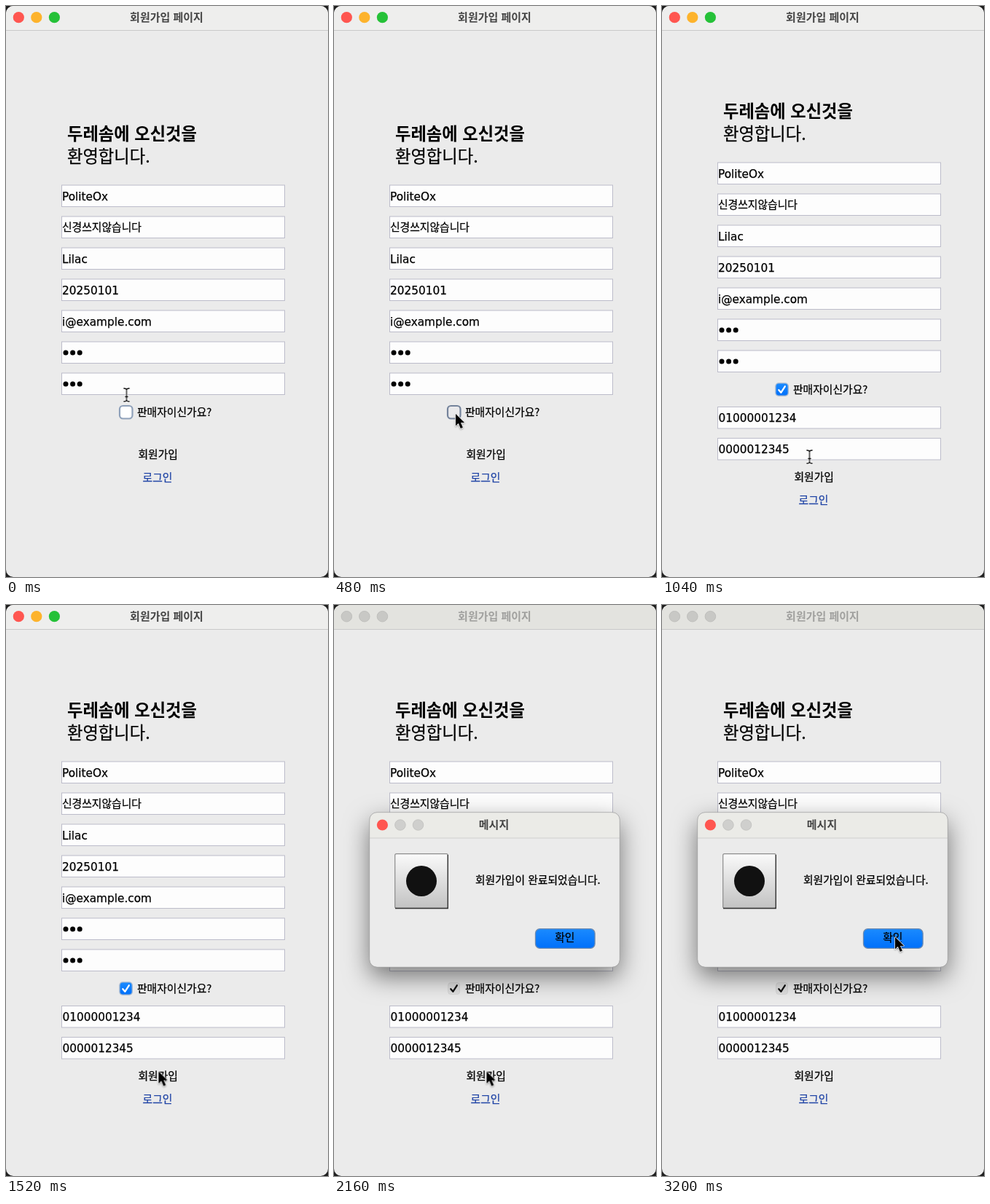
An HTML page for the animation above (3360 ms loop, 442 by 784 pixels).

```html
<!DOCTYPE html>
<html lang="ko">
<head>
<meta charset="utf-8">
<title>회원가입 페이지</title>
<style>
html, body { margin: 0; width: 100%; height: 100%; overflow: hidden; background: #1e1e1e; }
svg { display: block; width: 442px; height: 784px; }
text { font: 14.8px "Noto Sans CJK KR", "Noto Sans CJK", sans-serif; stroke: #000; stroke-width: .25px; }
.latin { font: 15.3px "DejaVu Sans", sans-serif; }
.big { font-size: 23.3px; }
.bold { font-weight: 700; stroke: none; }
.mid { text-anchor: middle; }
.link { fill: #2246a6; stroke: #2246a6; }

/* One loop is 42 slots of 80 ms; keyframe percentages are slot / 42. */
.open, .press, .leave, .done, .move, .beam, .arrow, .hold { animation: 3360ms step-end infinite; }
.open { animation-name: open; }
.leave { animation-name: leave; }
.done { animation-name: done; }
.hold { animation-name: hold; }
.move { animation-name: move; }
.beam { animation-name: beam; }
.arrow { animation-name: arrow; }
.shift { animation: shift 3360ms step-end infinite; }
.off { --a: 1; --b: 0; }

@keyframes open { 0% { opacity: var(--a, 0) } 16.66%, to { opacity: var(--b, 1) } }
@keyframes leave { 0% { opacity: var(--a, 0) } 59.52%, to { opacity: var(--b, 1) } }
@keyframes done { 0% { opacity: var(--a, 0) } 64.28%, to { opacity: var(--b, 1) } }
@keyframes shift { 0% { transform: none } 16.66%, to { transform: translateY(var(--dy)) } }
@keyframes hold { 0% { fill: #fff; stroke: #8fa1ba } 11.9%, to { fill: #e9e9eb; stroke: #74839b } }
@keyframes beam {
  0% { opacity: 1 } 2.38% { opacity: 0 } 16.66% { opacity: 1 }
  23.8% { opacity: 0 } 26.18% { opacity: 1 } 33.33%, to { opacity: 0 }
}
@keyframes arrow {
  0% { opacity: 0 } 2.38% { opacity: 1 } 16.66% { opacity: 0 }
  23.8% { opacity: 1 } 26.18% { opacity: 0 } 33.33%, to { opacity: 1 }
}
@keyframes move {
  0% { transform: translate(165.5px, 534px); animation-timing-function: steps(5) }
  11.9% { transform: translate(167px, 560px) }
  16.66% { transform: translate(166.5px, 560px); animation-timing-function: steps(6) }
  30.95% { transform: translate(202.5px, 619px); animation-timing-function: steps(4) }
  40.47% { transform: translate(209.5px, 640.5px) }
  66.66% { transform: translate(209.5px, 640.5px); animation-timing-function: steps(2) }
  71.42% { transform: translate(226px, 612px); animation-timing-function: steps(4) }
  80.95% { transform: translate(302px, 485px); animation-timing-function: steps(2) }
  85.71%, to { transform: translate(320px, 456px) }
}
</style>
</head>
<body>
<svg viewBox="0 0 442 784">
  <defs>
    <rect id="field" x="76.5" y="0.5" width="306" height="29.5" fill="#fdfdfd" stroke="#bcbcca"/>
    <g id="dots"><circle cx="82" cy="15.5" r="3.5"/><circle cx="91.6" cy="15.5" r="3.5"/><circle cx="101.2" cy="15.5" r="3.5"/></g>
    <path id="check" d="M160.3 527.2L163.3 530.8L168.8 522.3" fill="none" stroke-width="2.3" stroke-linecap="round" stroke-linejoin="round"/>
    <linearGradient id="blue" x2="0" y2="1"><stop stop-color="#1a8aff"/><stop offset="1" stop-color="#0070fa"/></linearGradient>
    <linearGradient id="plate" x2="0" y2="1"><stop stop-color="#fafafa"/><stop offset="1" stop-color="#c2c2c2"/></linearGradient>
  </defs>

  <!-- Window -->
  <rect width="442" height="784" rx="10" fill="#ebebeb"/>
  <path d="M0 33V10A10 10 0 0 1 10 0H432A10 10 0 0 1 442 10V33Z" fill="#eeeeed"/>
  <g class="done off">
    <circle cx="17.3" cy="15.7" r="7.6" fill="#ff5650"/>
    <circle cx="41.8" cy="15.7" r="7.6" fill="#fdb32c"/>
    <circle cx="66.4" cy="15.7" r="7.6" fill="#25c138"/>
    <text class="bold mid" x="220.5" y="20.5" style="font-size:15px" fill="#444">회원가입 페이지</text>
  </g>
  <g class="done">
    <path d="M0 33V10A10 10 0 0 1 10 0H432A10 10 0 0 1 442 10V33Z" fill="#e3e3df"/>
    <g fill="#c8c8c5" stroke="#b9b9b6" stroke-width=".8">
      <circle cx="17.3" cy="15.7" r="7.3"/><circle cx="41.8" cy="15.7" r="7.3"/><circle cx="66.4" cy="15.7" r="7.3"/>
    </g>
    <text class="bold mid" x="220.5" y="20.5" style="font-size:15px" fill="#a0a09e">회원가입 페이지</text>
  </g>
  <path d="M0 33.5H442" stroke="#c9c9c9"/>

  <!-- Form -->
  <g class="shift" style="--dy:-31px">
    <text class="big bold" x="84" y="184">두레솜에 오신것을</text>
    <text class="big" x="84" y="214.5">환영합니다.</text>
    <g transform="translate(0 245.5)"><use href="#field"/><text class="latin" x="77" y="21">PoliteOx</text></g>
    <g transform="translate(0 288.5)"><use href="#field"/><text x="77" y="20.5">신경쓰지않습니다</text></g>
    <g transform="translate(0 331.5)"><use href="#field"/><text class="latin" x="77" y="21">Lilac</text></g>
    <g transform="translate(0 374.5)"><use href="#field"/><text class="latin" x="77" y="21">20250101</text></g>
    <g transform="translate(0 417.5)"><use href="#field"/><text class="latin" x="77" y="21">i@example.com</text></g>
    <g transform="translate(0 460.5)"><use href="#field"/><use href="#dots"/></g>
    <g transform="translate(0 503.5)"><use href="#field"/><use href="#dots"/></g>
    <text x="180" y="563">판매자이신가요?</text>
  </g>

  <!-- Checkbox -->
  <g class="open off">
    <rect class="hold" x="156" y="549" width="17.5" height="17.5" rx="4.5" stroke-width="2.2"/>
  </g>
  <g class="open">
    <g class="leave off"><rect x="155.2" y="517.2" width="18.8" height="18.8" rx="5" fill="#a3b8d2"/></g>
    <g class="done off">
      <rect x="156.6" y="518.6" width="16" height="16" rx="3.8" fill="url(#blue)"/>
      <use href="#check" stroke="#fff"/>
    </g>
    <g class="done">
      <rect x="156.6" y="518.6" width="16" height="16" rx="3.8" fill="#dfdfdf" stroke="#d0d0d0" stroke-width=".7"/>
      <use href="#check" stroke="#111"/>
    </g>
    <g transform="translate(0 550)"><use href="#field"/><text class="latin" x="77.5" y="21">01000001234</text></g>
    <g transform="translate(0 593)"><use href="#field"/><text class="latin" x="77.5" y="21">0000012345</text></g>
  </g>

  <g class="shift" style="--dy:31px">
    <text class="mid" x="208.7" y="620.5">회원가입</text>
    <text class="mid link" x="208" y="652.5">로그인</text>
  </g>

  <!-- Message -->
  <g class="done">
    <rect x="49" y="285" width="343" height="212" rx="10" fill="#ebebeb" style="filter:drop-shadow(0 13px 17px rgba(0,0,0,.52))"/>
    <path d="M49 320V295A10 10 0 0 1 59 285H382A10 10 0 0 1 392 295V320Z" fill="#ebebe7"/>
    <path d="M49 320H392" stroke="#d0d0ce"/>
    <rect x="48.7" y="284.7" width="343.6" height="212.6" rx="10.3" fill="none" stroke="#a5a5a5" stroke-width=".8"/>
    <circle cx="66.4" cy="302" r="7.6" fill="#ff5650"/>
    <g fill="#cfcfcd" stroke="#bfbfbd" stroke-width=".8"><circle cx="90.9" cy="302" r="7.3"/><circle cx="115.5" cy="302" r="7.3"/></g>
    <text class="bold mid" x="219.5" y="306.5" style="font-size:15px" fill="#444">메시지</text>
    <rect x="83.7" y="341.7" width="72.6" height="74.6" rx="2" fill="url(#plate)" stroke="#8c8c8c" stroke-width="1.2"/>
    <path d="M84 416.5H156.3V343" fill="none" stroke="#333" stroke-width="1.3"/>
    <circle cx="120" cy="379" r="21" fill="#111"/>
    <text x="194" y="382.5">회원가입이 완료되었습니다.</text>
    <rect x="276.5" y="444.7" width="81.6" height="26.6" rx="6" fill="url(#blue)" stroke="#6f8bb0" stroke-width="1.3"/>
    <text class="mid" x="316.8" y="462.3">확인</text>
  </g>

  <!-- Pointer -->
  <g class="move">
    <g class="beam" fill="none" stroke-linecap="square">
      <path id="ibeam" d="M-3.5-9Q0-9 0-6.5Q0-9 3.5-9M0-6.5V6.5M-3.5 9Q0 9 0 6.5Q0 9 3.5 9M-1.5 2.5H1.5" stroke="#fff" stroke-width="2.8"/>
      <path d="M-3.5-9Q0-9 0-6.5Q0-9 3.5-9M0-6.5V6.5M-3.5 9Q0 9 0 6.5Q0 9 3.5 9M-1.5 2.5H1.5" stroke="#111" stroke-width="1.3"/>
    </g>
    <g class="arrow" style="filter:drop-shadow(0 1px 1px rgba(0,0,0,.35))">
      <path d="M0 0V16.6L3.8 13L6.8 20L9.9 18.7L7 11.9H12.1Z" stroke="#fff" stroke-width="1.4" stroke-linejoin="round" paint-order="stroke"/>
    </g>
  </g>
</svg>
</body>
</html>
```
